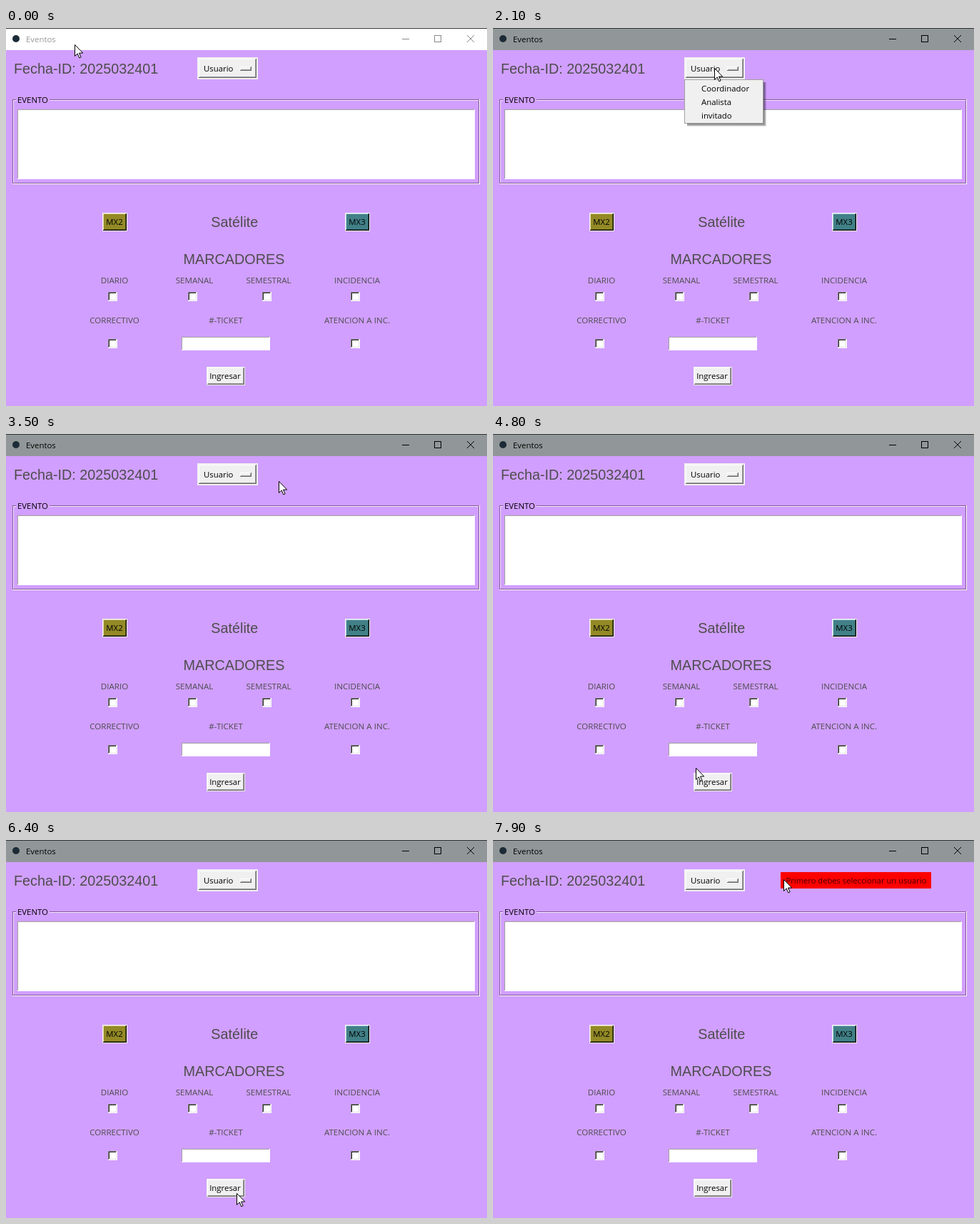
Animation of 674x530 px, one loop 8 s. Source, as an HTML page:

```html
<!DOCTYPE html>
<html lang="es">
<head>
<meta charset="utf-8">
<title>Eventos</title>
<style>
  html, body { margin: 0; width: 100%; height: 100%; overflow: hidden; background: #d19fff; }
  svg { display: block; }
  rect { shape-rendering: crispEdges; }
  text { font: 11.4px "Open Sans", "Noto Sans", sans-serif; }
  .big { font: 19.8px "Liberation Sans", Arial, sans-serif; fill: #4d4d4d; }
  .label { font-size: 11.6px; fill: #4d4d4d; }
  .alert { font-size: 11.2px; fill: #400; }
  .mid { text-anchor: middle; }
</style>
</head>
<body>
<svg id="stage" width="674" height="530" viewBox="0 0 674 530"></svg>
<script>
const stage = document.getElementById("stage");

const rect = (x, y, w, h, fill, extra = "") =>
  `<rect x="${x}" y="${y}" width="${w}" height="${h}" fill="${fill}" ${extra}/>`;

// Text whose capitals are centred on y
const text = (x, y, s, cls = "") => `<text x="${x}" y="${y + 4}" class="${cls}">${s}</text>`;
const title = (x, y, s, cls = "") => `<text x="${x}" y="${y}" class="big ${cls}">${s}</text>`;

// One-pixel edge: top and left in one colour, bottom and right in another
const bevel = (x, y, w, h, light, dark) =>
  rect(x, y, w, 1, light) + rect(x, y, 1, h, light) +
  rect(x, y + h - 1, w, 1, dark) + rect(x + w - 1, y, 1, h, dark);

// Raised face inside a pale focus ring
const raised = (x, y, w, h, ring, fill, light, shade, dark) => {
  const [l, t, iw, ih] = [x + ring, y + ring, w - 2 * ring, h - 2 * ring];
  return rect(x, y, w, h, "#f0f0f0") + rect(l, t, iw, ih, fill) +
    bevel(l, t, iw, ih, light, dark) + bevel(l + 1, t + 1, iw - 2, ih - 2, fill, shade);
};

const greyButton = (x, y, w, h, ring) =>
  raised(x, y, w, h, ring, "#f0f0f0", "#fff", "#a0a0a0", "#696969");

const sunken = (x, y, w, h) =>
  rect(x, y, w, h, "#fff") + bevel(x, y, w, h, "#a0a0a0", "#fff");

const check = (cx, cy) =>
  rect(cx - 6, cy - 6, 13, 13, "#fff") +
  bevel(cx - 6, cy - 6, 13, 13, "#8a8a8a", "#fff") +
  bevel(cx - 5, cy - 5, 11, 11, "#222", "#e3e3e3");

const titleBar =
  rect(0, 0, 674, 31, "#fff", 'id="bar"') +
  rect(0, 0, 674, 1, "#333") +
  `<circle cx="14" cy="15" r="5" fill="#1c2b36"/>` +
  `<g id="caption">${text(28, 16, "Eventos")}</g>
   <g id="controls" fill="none" stroke-width="1">
     <path d="M555 15.5h10M600.5 10.5h9v9h-9z" shape-rendering="crispEdges"/>
     <path d="M646 10l10 10M656 10l-10 10"/>
   </g>`;

const userButton =
  greyButton(268, 41, 85, 31, 2) +
  text(277, 57, "Usuario") +
  rect(328, 54, 16, 6, "#f0f0f0") + bevel(328, 54, 16, 6, "#fff", "#696969") +
  bevel(329, 55, 14, 4, "#f0f0f0", "#a0a0a0");

const eventBox =
  bevel(9, 100, 655, 119, "#85569f", "#fff") +
  bevel(10, 101, 653, 117, "#f6ebff", "#85569f") +
  rect(14, 98, 47, 5, "#d19fff") + text(16, 101, "EVENTO") +
  sunken(16, 114, 641, 98);

const satellites =
  raised(135, 259, 35, 26, 1, "#938a26", "#e6dcae", "#5d5718", "#000") +
  text(152, 272, "MX2", "mid") +
  raised(475, 259, 35, 26, 1, "#418087", "#c4dcec", "#285156", "#000") +
  text(492, 272, "MX3", "mid") +
  title(320.3, 279, "Satélite", "mid");

const labels = [
  [152, 354, "DIARIO"], [264, 354, "SEMANAL"], [368, 354, "SEMESTRAL"], [492, 354, "INCIDENCIA"],
  [152, 410, "CORRECTIVO"], [308, 410, "#-TICKET"], [492, 410, "ATENCION A INC."]
];
const checks = [[149, 376], [261, 376], [365, 376], [489, 376], [149, 442], [489, 442]];

const markers =
  title(319.5, 331, "MARCADORES", "mid") +
  labels.map(([x, y, s]) => text(x, y, s, "label mid")).join("") +
  checks.map(c => check(...c)).join("") +
  sunken(246, 433, 124, 19) +
  greyButton(281, 475, 54, 26, 1) + text(307, 488, "Ingresar", "mid");

const alertBox =
  `<g id="alert">${rect(403, 45, 211, 23, "#f00")}${
    text(509, 57, "Primero debes seleccionar un usuario", "alert mid")}</g>`;

const menu =
  `<g id="shadow">${[1, 2, 3, 4].map(i =>
    rect(379, 76, i, 58 + i, "#000", 'opacity=".15"') +
    rect(272, 134, 107, i, "#000", 'opacity=".15"')).join("")}</g>
   <g id="menu">${rect(268, 72, 111, 62, "#f0f0f0")}${bevel(268, 72, 111, 62, "#a0a0a0", "#a0a0a0")}${
    ["Coordinador", "Analista", "invitado"].map((s, i) => text(292, 85 + 19 * i, s)).join("")}</g>`;

const pointer =
  `<path id="pointer" d="M.5.5v16l3.7-3.6 2.6 6 2.3-1-2.6-5.8h5.2z" fill="#fff" stroke="#000"/>`;

stage.innerHTML = rect(0, 0, 674, 530, "#d19fff") + titleBar + title(11, 64, "Fecha-ID: 2025032401") +
  userButton + eventBox + satellites + markers + alertBox + menu + pointer;

// Pointer stops: time, x, y
const stops = [
  [0, 96, 23], [700, 310, 56], [2500, 310, 56], [3000, 382, 66], [3700, 382, 66],
  [4700, 284, 468], [4900, 284, 468], [5500, 321, 499], [6100, 323, 495],
  [6700, 323, 495], [7700, 407, 55], [8000, 407, 55]
];

function pointerAt(t) {
  const i = stops.findIndex(s => s[0] > t);
  const [t0, x0, y0] = stops[i - 1], [t1, x1, y1] = stops[i];
  const u = (t - t0) / (t1 - t0), e = u * u * (3 - 2 * u);
  return [Math.round(x0 + (x1 - x0) * e), Math.round(y0 + (y1 - y0) * e)];
}

const el = id => document.getElementById(id);
const set = (id, name, value) => el(id).setAttribute(name, value);

function draw(now) {
  const t = Math.floor(now % 8000 / 100) * 100;   // ten pictures a second
  const active = t >= 800, open = t > 800 && t < 3200;
  set("bar", "fill", active ? "#919798" : "#fff");
  set("caption", "fill", active ? "#000" : "#999");
  set("controls", "stroke", active ? "#000" : "#888");
  set("menu", "opacity", open ? Math.min(1, (t - 800) / 250) : 0);
  set("shadow", "opacity", open ? 1 : 0);
  set("alert", "opacity", t >= 6600 ? 1 : 0);
  set("pointer", "transform", `translate(${pointerAt(t)})`);
  requestAnimationFrame(draw);
}
requestAnimationFrame(draw);
</script>
</body>
</html>
```
